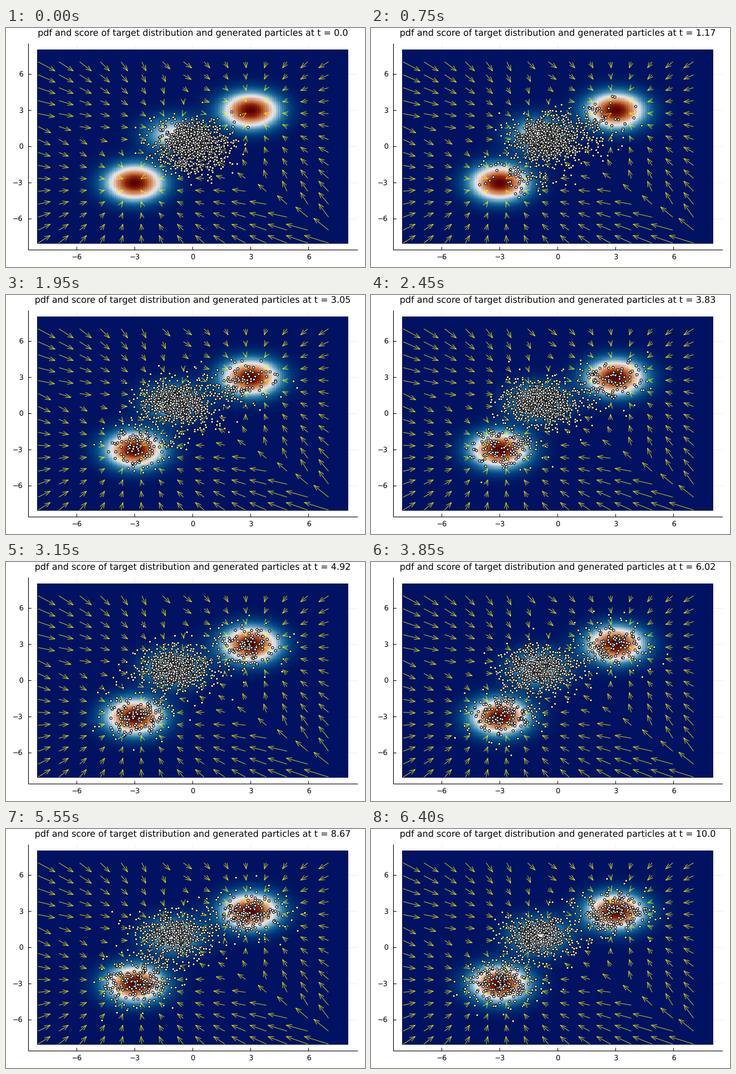
Animation of 600 by 400 pixels, one loop 6.45 s. Source, as a matplotlib script:

```python
import numpy as np
import matplotlib.pyplot as plt
from matplotlib.animation import FuncAnimation
from matplotlib.collections import LineCollection
from matplotlib.colors import LinearSegmentedColormap

W, H, DPI = 600, 400, 100
FRAMES, T_END, N = 129, 10.0, 1000
PT = 72 / DPI  # points per pixel

plt.rcParams.update({"font.family": "DejaVu Sans", "text.hinting": "none"})

MEANS = np.array([[3, 3], [-3, -3], [-1, 1]], float)
WEIGHTS = np.array([0.4, 0.4, 0.2])
CELLS = 150
GRID = np.linspace(-8, 8, CELLS)

# pixel box of the heatmap and of the axes around it
L, R, TOP, BOT = 52, 572, 36, 361
AX_L, AX_R, AX_T, AX_B = 37.5, 588, 26, 371.5
SPAN = 16 * CELLS / (CELLS - 1)


def to_px(p):
    p = np.asarray(p, float)
    x = (L + R) / 2 + p[..., 0] * (R - L) / SPAN
    y = (TOP + BOT) / 2 - p[..., 1] * (BOT - TOP) / SPAN
    return np.stack([x, y], axis=-1)


def parts(p):
    diff = MEANS - p[..., None, :]
    return diff, WEIGHTS * np.exp(-0.5 * (diff ** 2).sum(-1))


def pdf(p):
    return parts(p)[1].sum(-1)


def score(p):
    diff, w = parts(p)
    return (w[..., None] * diff).sum(-2) / w.sum(-1, keepdims=True)


def mesh(v):
    return np.stack(np.meshgrid(v, v), axis=-1)


def simulate():
    """Langevin dynamics started from a standard normal cloud."""
    rng = np.random.default_rng(12)
    dt = T_END / (FRAMES - 1)
    x = rng.standard_normal((N, 2))
    path = [x]
    for _ in range(FRAMES - 1):
        x = x + 0.5 * dt * score(x) + np.sqrt(dt) * rng.standard_normal(x.shape)
        path.append(x)
    return to_px(np.array(path))


def arrows(head=10, spread=np.radians(20)):
    tails = mesh(GRID[::10]).reshape(-1, 2)
    a, b = to_px(tails), to_px(tails + score(tails) / 8)
    segs = []
    for p, q in zip(a, b):
        ang = np.arctan2(*(p - q)[::-1])
        barbs = [q + head * np.array([np.cos(ang + s), np.sin(ang + s)])
                 for s in (spread, -spread)]
        segs += [[p, q], [barbs[0], q, barbs[1]]]
    return segs


stops = ["#001261", "#023e7d", "#1d6e9d", "#71a7c4", "#c9dde7",
         "#eacebd", "#d39774", "#be6533", "#8b2706", "#590008"]
ramp = [(i / 9, c) for i, c in enumerate(stops)]
ramp.insert(5, (0.5, "#ece5e0"))
vik = LinearSegmentedColormap.from_list("vik", ramp)

fig = plt.figure(figsize=(W / DPI, H / DPI), dpi=DPI, facecolor="white")
ax = fig.add_axes([0, 0, 1, 1])
ax.axis("off")


def line(xs, ys, width=1.0, **kw):
    ax.plot(xs, ys, color="black", lw=width * PT, snap=False,
            solid_capstyle="butt", **kw)


for v in (-6, -3, 0, 3, 6):
    x, y = to_px([v, v])
    line([x, x], [AX_T, AX_B], 0.7, alpha=0.1, zorder=0)
    line([AX_L, AX_R], [y, y], 0.7, alpha=0.1, zorder=0)
    line([x, x], [AX_B, AX_B - 5], zorder=3)
    line([AX_L, AX_L + 5], [y, y], zorder=3)
    label = str(v).replace("-", "\u2212")
    ax.text(x, 387.7, label, size=11.84 * PT, ha="center", va="baseline")
    ax.text(28.5, y + 4.6, label, size=11.84 * PT, ha="right", va="baseline")
line([AX_L, AX_L], [AX_T, AX_B], zorder=3)
line([AX_L, AX_R], [AX_B, AX_B], zorder=3)

ax.imshow(pdf(mesh(GRID)), cmap=vik, origin="lower", aspect="auto",
          extent=(L, R, BOT, TOP), interpolation="nearest", zorder=1)
ax.add_collection(LineCollection(arrows(), colors="#ffff00", alpha=0.75,
                                 linewidths=1.0 * PT, snap=False, zorder=4))
dots, = ax.plot([], [], "o", ms=3.9 * PT, mfc="white", mec="black",
                mew=1.0 * PT, snap=False, zorder=5)
title = ax.text((L + R) / 2 + 0.5, 12.8, "", size=14.84 * PT,
                ha="center", va="baseline")
ax.set_xlim(0, W)
ax.set_ylim(H, 0)

PATH = simulate()


def update(i):
    dots.set_data(PATH[i, :, 0], PATH[i, :, 1])
    t = round(T_END * i / (FRAMES - 1), 2)
    title.set_text("pdf and score of target distribution and "
                   f"generated particles at t = {t}")
    return dots, title


anim = FuncAnimation(fig, update, frames=FRAMES, interval=50,
                     repeat=True, repeat_delay=0, blit=False)
plt.show()
```
